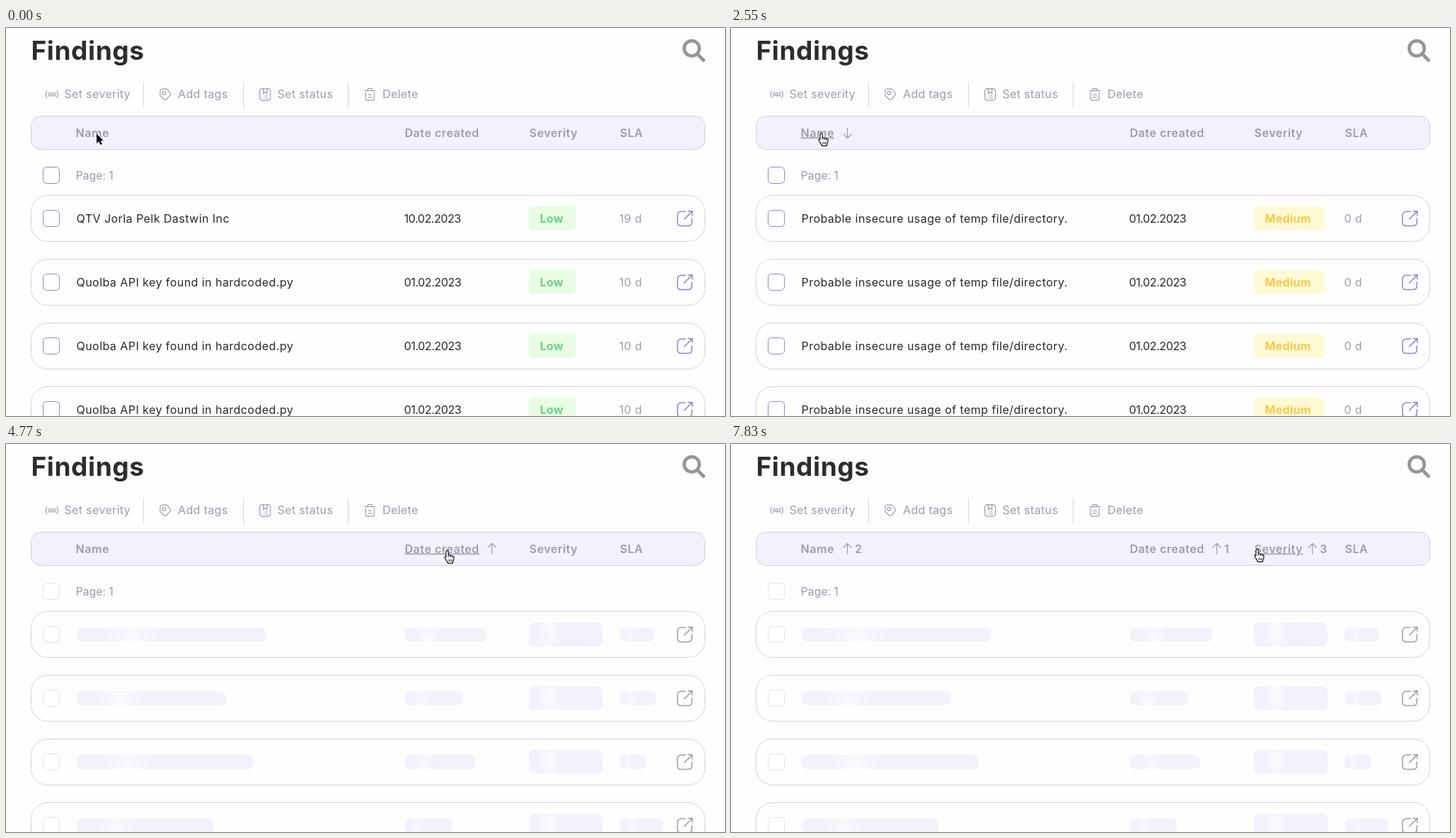
An HTML page that plays this animation: 1016x548 px, repeating every 8000 ms.

```html
<!DOCTYPE html>
<html lang="en">
<head>
<meta charset="utf-8">
<title>Findings</title>
<style>
html, body { margin: 0; width: 100%; height: 100%; overflow: hidden; background: #fefefe; }
svg { display: block; width: 100%; height: 100%; }
text { font: 400 16px Inter, sans-serif; letter-spacing: .36px; fill: #9a9eac; white-space: pre; }
.title { font-weight: 700; font-size: 37px; letter-spacing: .6px; fill: #2d2d2d; }
.tool { letter-spacing: .35px; }
.page { letter-spacing: -.1px; }
.head { font-weight: 600; letter-spacing: .55px; }
.name { letter-spacing: .45px; fill: #292929; }
.date { letter-spacing: -.4px; fill: #292929; }
.badge { font-weight: 700; letter-spacing: .3px; }
.hover { text-decoration: underline; }
.line { fill: none; stroke: #9a9eac; stroke-width: 1.2; stroke-linecap: round; stroke-linejoin: round; }
</style>
</head>
<body>
<svg viewBox="0 0 1016 548" xmlns="http://www.w3.org/2000/svg">
  <defs>
    <linearGradient id="sheen">
      <stop offset="0" stop-color="#f3f1fc"/>
      <stop offset=".5" stop-color="#f9f8fe"/>
      <stop offset="1" stop-color="#f3f1fc"/>
    </linearGradient>
  </defs>
  <rect width="1016" height="548" fill="#fefefe"/>
  <text class="title" x="35.5" y="45">Findings</text>
  <g fill="none" stroke="#959595" stroke-width="4.6" stroke-linecap="round">
    <circle cx="969" cy="28.8" r="10.7"/>
    <path d="M977 36.8L985.8 45.6"/>
  </g>
  <g class="line">
    <circle cx="64.8" cy="93.8" r="2"/>
    <path d="M61.2 90.8q-2 3 0 6M68.4 90.8q2 3 0 6M57.9 89q-3.6 4.8 0 9.6M71.7 89q3.6 4.8 0 9.6"/>
    <path d="M219.5 86.3l6-.5q1.4 0 2.4 1l4 5q1.2 1.6 0 3l-5 5.7q-1.6 1.5-3.2.2l-5-4.2q-1-.9-1-2.2l.2-6q.2-1.8 1.6-2z"/>
    <circle cx="223.3" cy="91.8" r="2.4"/>
    <rect x="358.6" y="85.6" width="15" height="16.6" rx="3.6"/>
    <path d="M363.6 86v6.6l2.6-2 2.6 2V86M362.2 96h.6M365.8 96h4.4M362.2 99h.6M365.8 99h4.4"/>
    <path d="M506.5 88.6h15.4M510.8 88.4v-1.2q0-1.6 1.6-1.6h3.6q1.6 0 1.6 1.6v1.2M508.2 91.4v8.2q0 2.6 2.6 2.6h6.8q2.6 0 2.6-2.6v-8.2M511.8 94.4h4.8M511.8 97.8h4.8"/>
  </g>
  <path d="M194.5 76v36M335.5 76v36M483.5 76v36" stroke="#d3d4dd"/>
  <g id="tools"></g>
  <rect x="35.5" y="124.5" width="952" height="47" rx="14" fill="#f3f1fc" stroke="#d0d0dc"/>
  <text class="page" x="98.5" y="213.5">Page: 1</text>
  <g id="live"></g>
  <g id="cursor"></g>
</svg>
<script>
const LOOP = 8000;
const $ = id => document.getElementById(id);

// The screen is redrawn at discrete moments: [first, last, count].
const RUNS = [[0, 0, 1], [450, 1200, 6], [1500, 1500, 1], [2100, 2550, 4], [3150, 4030, 7],
  [4470, 5510, 8], [5950, 6500, 5], [6640, 6930, 3], [7080, 7080, 1], [7530, 7830, 3]];
const TICKS = RUNS.flatMap(([a, b, n]) =>
  Array.from({ length: n }, (_, i) => Math.floor(a + (n > 1 ? (b - a) * i / (n - 1) : 0))));

const LOADS = [[600, 1500], [2100, 2550], [3150, 3740], [4470, 5060], [5950, 6785], [7530, 8000]];

const BARS = [
  { name: [311, 298, 237, 202], date: [74, 106, 82, 115], sla: [61, 46, 58, 42] },
  { name: [268, 211, 250, 193], date: [117, 83, 100, 68], sla: [49, 52, 38, 62] }
];

const LEVELS = {
  Low: { w: 66, bg: '#e9fde5', ink: '#68d388' },
  High: { w: 71, bg: '#fff0e0', ink: '#ff9664' },
  Medium: { w: 100, bg: '#fffad5', ink: '#f6ca4c' }
};

const item = (name, date, level, sla) => ({ name, date, level, sla });
const inc = item('QTV Jorla Pelk Dastwin Inc', '10.02.2023', 'Low', '19 d');
const key = item('Quolba API key found in hardcoded.py', '01.02.2023', 'Low', '10 d');
const flask = item('A Flask app appears to be run with debug=True, whic...', '01.02.2023', 'High', '-6 d');
const temp = item('Probable insecure usage of temp file/directory.', '01.02.2023', 'Medium', '0 d');
const PAGES = [
  [0, [inc, key, key, key]],
  [1500, [flask, flask, flask, flask]],
  [2550, [temp, temp, temp, temp]],
  [3740, [inc, key, key, key]],
  [6785, [inc, flask, flask, flask]]
];

const COLUMNS = [
  { label: 'Name', x: 98.5, end: 186, arrow: 164.5 },
  { label: 'Date created', x: 563.5, end: 706, arrow: 686.5 },
  { label: 'Severity', x: 739.5, end: 846, arrow: 821.5 },
  { label: 'SLA', x: 867.5, end: 900, arrow: 915 }
];

// Sort marks per column: direction and optional order.
const SORTS = [
  [0, []],
  [600, [['up']]],
  [2100, [['down']]],
  [3150, []],
  [4470, [, ['up']]],
  [5950, [['up', 2], ['up', 1]]],
  [7530, [['up', 2], ['up', 1], ['up', 3]]]
];

const PATH = [[0, 131, 158], [3440, 131, 158], [3600, 190, 157], [3880, 600, 160], [4030, 627, 160],
  [4920, 627, 160], [5360, 180, 158], [5510, 130, 159], [6090, 130, 159], [6360, 480, 141],
  [6500, 685, 151], [6640, 735, 155], [6930, 746, 158], [7080, 747, 158], [LOOP, 747, 158]];

const latest = (list, t) => list.filter(e => e[0] <= t).pop()[1];

function pointer(t) {
  const i = Math.max(1, PATH.findIndex(p => p[0] > t));
  const [a, ax, ay] = PATH[i - 1], [b, bx, by] = PATH[i];
  const k = (t - a) / (b - a);
  return [ax + (bx - ax) * k, ay + (by - ay) * k];
}

const text = (cls, x, y, s, more = '') => `<text class="${cls}" x="${x}" y="${y}" ${more}>${s}</text>`;
const box = (x, y, w, h, r, paint) => `<rect x="${x}" y="${y}" width="${w}" height="${h}" rx="${r}" ${paint}/>`;
const check = (y, busy) => box(52.5, y, 23, 23, 5, `fill="#fff" stroke="${busy ? '#e3e0f5' : '#8f80e2'}"`);

function header(sorts, hover) {
  return COLUMNS.map((c, i) => {
    let out = text('head' + (i === hover ? ' hover' : ''), c.x, 153.6, c.label);
    if (sorts[i]) {
      const [dir, order] = sorts[i];
      const head = dir === 'up' ? 'M-5.5-2L0-7.5 5.5-2' : 'M-5.5 2L0 7.5 5.5 2';
      out += `<path class="line" transform="translate(${c.arrow} 148)" d="M0-7V7${head}"/>`;
      if (order) out += text('head', c.arrow + 10.5, 153.6, order);
    }
    return out;
  }).join('');
}

function cells(r, y) {
  const lv = LEVELS[r.level];
  return text('name', 99.5, y + 38.6, r.name) + text('date', 562.5, y + 38.6, r.date) +
    box(739, y + 16, lv.w, 34, 6, `fill="${lv.bg}"`) +
    text('badge', 754.5, y + 38.6, r.level, `style="fill:${lv.ink}"`) +
    text('', 866.5, y + 38.6, r.sla);
}

function bones(set, i, y) {
  const paint = 'fill="url(#sheen)"';
  const bar = (x, w) => box(x, y + 23, w, 20, 8, paint);
  return bar(100, set.name[i]) + bar(563, set.date[i]) + bar(867, set.sla[i]) +
    box(739, y + 16, 104, 34, 8, paint);
}

function row(i, data, set) {
  const y = 236 + 90 * i;
  const ink = set ? '#9a9eac' : '#8f80e2';
  return box(35.5, y + .5, 952, 65, 23, 'fill="#fefefe" stroke="#d3d3dc"') + check(y + 21.5, set) +
    (set ? bones(set, i, y) : cells(data[i], y)) +
    `<path class="line" style="stroke:${ink};stroke-width:1.5" transform="translate(948 ${y + 22})"
      d="M12 1.2H6.5Q.8 1.2.8 7V16Q.8 21.6 6.5 21.6H15.5Q21.2 21.6 21.2 16V11M10.5 12L21.6.9M16 .8H21.8V6.6"/>`;
}

const HAND = `<g transform="translate(.7 -.5) scale(1.1)" stroke="#111">
  <path d="M-3.8-8c.9 0 1.5.7 1.5 1.6v4.3c.5-.7 2.2-.5 2.5.5.6-.6 2.1-.3 2.4.8.7-.5 2.2 0 2.2 1.5
  0 2.6-.2 3.5-1 5-.4.7-.5 1.2-.5 2.3h-6.3c-.2-1.4-1.1-2.3-1.9-3.5l-2-3.1c-.8-1.3.7-2.4 1.6-1.3V-6.4
  C-5.3-7.3-4.7-8-3.8-8z" fill="#fff" stroke-width="1.1" stroke-linejoin="round"/>
  <path d="M-2.3-2V.6M.2-1.4V.8M2.6-.6V1.2M-1.6 3V6M.3 3V6M2.1 3V6" stroke-width=".8"/></g>`;
const ARROW = `<path transform="translate(-3 -8.5)" d="M0 0V13.4L3.1 10.6 5.4 15.6 7.8 14.6 5.6 9.7H9.6Z"
  fill="#000" stroke="#fff" stroke-width="1" stroke-linejoin="round" paint-order="stroke"/>`;

function draw(t) {
  const [x, y] = pointer(t);
  const tip = x - 4;
  const hover = t < 450 ? -1 : COLUMNS.findIndex(c => tip >= c.x - 2 && tip <= c.end);
  const load = LOADS.findIndex(([a, b]) => t >= a && t < b);
  const set = load < 0 ? null : BARS[load % 2];
  if (set) {
    const mid = -.6 + 3 * ((t - LOADS[load][0]) % 1000) / 1000;
    $('sheen').setAttribute('x1', mid - .15);
    $('sheen').setAttribute('x2', mid + .15);
  }
  const data = latest(PAGES, t);
  $('live').innerHTML = header(latest(SORTS, t), hover) + check(196.5, set) +
    [0, 1, 2, 3].map(i => row(i, data, set)).join('');
  $('cursor').setAttribute('transform', `translate(${x} ${y})`);
  $('cursor').innerHTML = hover < 0 ? ARROW : HAND;
}

$('tools').innerHTML = [[82.5, 'Set severity'], [243, 'Add tags'], [383.5, 'Set status'], [532, 'Delete']]
  .map(([x, s]) => text('tool', x, 99.4, s)).join('');

const start = performance.now();
let shown = -1;
function frame(now) {
  const t = Math.max(0, now - start) % LOOP;
  const tick = TICKS.filter(k => k <= t).pop();
  if (tick !== shown) draw(shown = tick);
  requestAnimationFrame(frame);
}
draw(shown = 0);
requestAnimationFrame(frame);
</script>
</body>
</html>
```
